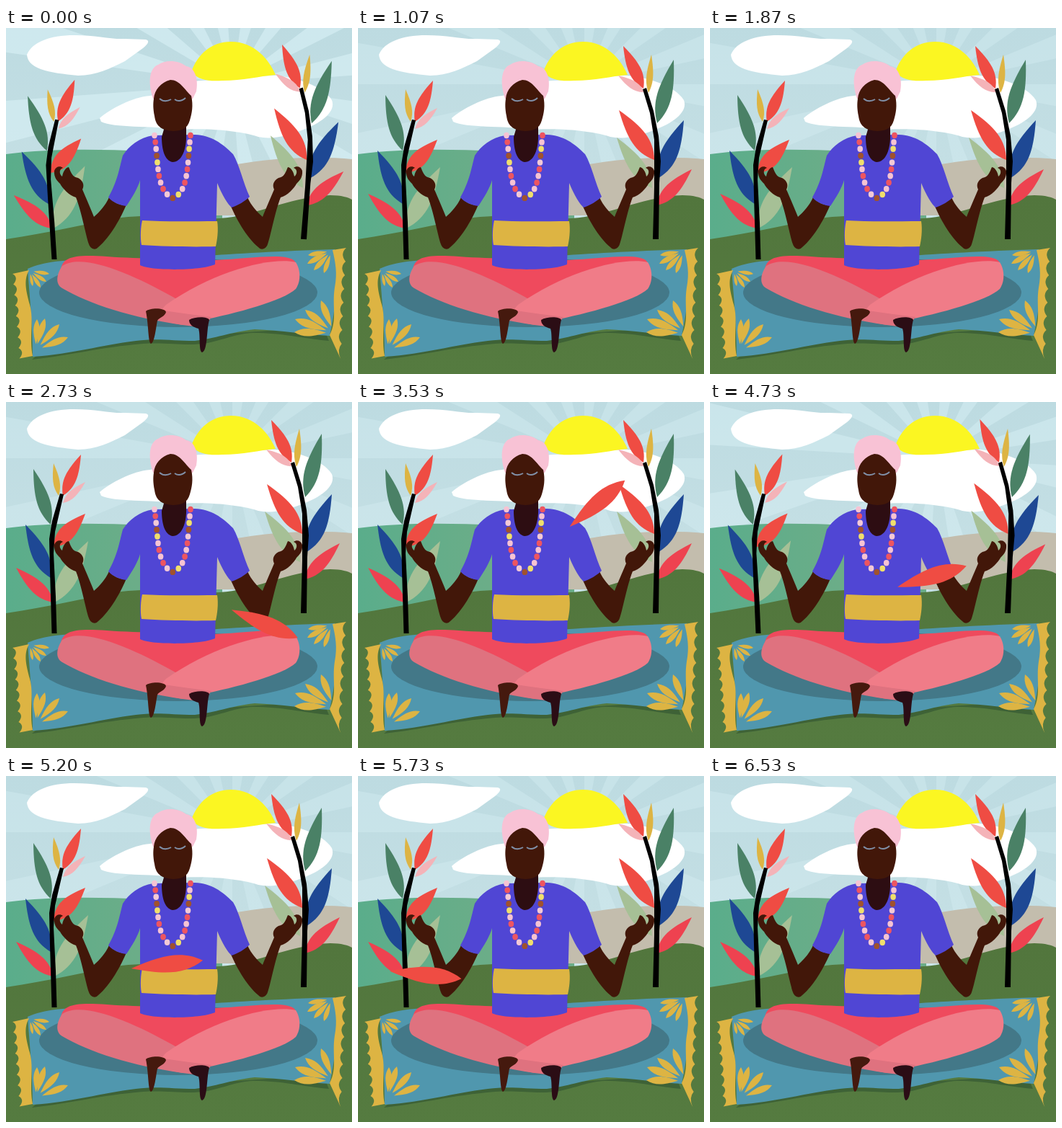
Animation, 480 px wide and 480 px high, one loop 6.59 s. Source, as an HTML page:

```html
<!DOCTYPE html>
<html lang="en">
<head>
<meta charset="utf-8">
<title>Meditation in the wind</title>
<style>
html, body { margin: 0; width: 100%; height: 100%; overflow: hidden; }
svg { display: block; width: 100vw; height: 100vh; }
</style>
</head>
<body>
<svg viewBox="0 0 480 480">
  <defs>
    <linearGradient id="sky" x2="0" y2="1">
      <stop stop-color="#bddbe1"/><stop offset=".4" stop-color="#c4dfe4"/>
    </linearGradient>
    <linearGradient id="hill">
      <stop stop-color="#5aad8b"/><stop offset=".6" stop-color="#6bad88"/>
    </linearGradient>
    <linearGradient id="grass" x2="0" y2="1">
      <stop stop-color="#52763d"/><stop offset="1" stop-color="#557b40"/>
    </linearGradient>
    <path id="arm" fill="#421709" d="M143 235C150 243 160 247 167 245C160 262 145 290 128 304C125 308 118 308 115 300C110 285 105 255 97 235C88 233 78 222 75 216C72 213 66 208 67 198C69 192 75 191 79 194C73 196 74 203 78 206C79 200 82 194 87 193C90 200 92 207 100 208C107 212 109 218 106 224C112 238 118 252 122 262C130 255 138 246 143 235Z"/>
  </defs>

  <rect width="480" height="480" fill="url(#sky)"/>
  <g id="rays" fill="#d6eff4"></g>
  <path fill="#fff" d="M29 37C36 20 60 10 95 10C125 10 145 16 165 15L194 16Q202 18 190 28L165 46C145 56 125 66 100 66C80 64 62 62 48 57C35 52 30 46 29 37Z"/>
  <path fill="#fff" d="M130 125C145 112 175 96 200 94C240 86 250 74 270 73C310 72 350 66 374 66C400 68 440 80 452 100C458 115 440 130 415 140C390 150 370 155 350 151C320 141 270 139 240 141C200 135 150 139 132 130Z"/>
  <path fill="#fbf622" d="M257 61C266 36 285 19 312 19C345 19 365 44 374 65C350 67 330 73 300 73C282 74 268 73 257 61Z"/>

  <path fill="url(#hill)" d="M0 175C60 167 130 168 190 171L300 190V300H0Z"/>
  <path fill="#c3bdad" d="M290 196C350 180 430 177 480 182V260H290Z"/>
  <path fill="url(#grass)" d="M0 293C60 284 110 272 160 263C220 256 260 270 315 262C360 254 400 234 450 232C465 232 475 235 480 238V480H0Z"/>

  <path fill="#3e6236" d="M36 460C90 454 130 443 190 438C230 436 250 442 280 437C310 430 325 422 350 423C390 424 420 432 448 434L440 415L60 440Z"/>
  <path fill="#5097ae" d="M30 334C60 320 110 321 150 322C220 322 300 312 456 307C462 350 457 390 449 427C420 426 380 419 345 418C310 422 290 431 262 434C230 434 210 430 180 434C130 440 95 452 37 456C37 415 33 375 30 334Z"/>
  <ellipse cx="239" cy="367" rx="193" ry="48" fill="#437888"/>
  <g id="rug" fill="#ddb443">
    <path d="M32 336L9 341q9 5 1.2 14.7q9 5 1.2 14.7q9 5 1.2 14.7q9 5 1.2 14.7q9 5 1.2 14.7q9 5 1.2 14.7q9 5 1.2 14.7q9 5 1.2 14.7L37 455C32 430 39 405 33 384C28 365 24 350 32 336Z"/>
    <path d="M453 308L472 305q-9 8 -.9 19q-9 8 -.9 19q-9 8 -.9 19q-9 8 -.9 19q-9 8 -.9 19q-9 8 -.9 19q-9 8 -.9 19q-7 8 -1.5 21L449 426C460 405 452 385 456 360C460 340 457 325 453 308Z"/>
  </g>

  <g id="left"></g>
  <g id="right"></g>

  <path fill="#ef4a5d" d="M76 336C78 317 95 314 140 317C190 321 230 318 290 322C340 320 390 311 401 324L405 345L240 400Z"/>
  <path fill="#df727f" d="M78 330C70 342 68 355 78 361C115 383 175 402 245 412L285 400L235 375C170 338 105 312 78 330Z"/>
  <path fill="#f07c88" d="M402 325C370 317 290 336 222 384C205 400 225 407 268 406C320 396 385 378 402 362C410 350 408 334 402 325Z"/>
  <path fill="#df727f" d="M205 390Q245 396 285 401L275 415Q240 413 215 405Z"/>
  <path fill="#45190e" d="M194 393C200 388 220 388 222 394C221 400 212 402 210 406C208 416 206 437 201 438C197 436 198 412 194 393Z"/>
  <path fill="#2b0d15" d="M254 405C262 400 280 400 282 405C278 418 280 448 272 450C267 448 270 425 267 417C260 415 254 412 254 405Z"/>

  <use href="#arm"/>
  <use href="#arm" transform="matrix(-1 0 0 1 478 0)"/>
  <path fill="#5046d4" d="M204 149C185 152 170 164 162 177C157 195 155 212 142 235C148 242 158 246 167 247C175 235 183 222 186 211L186 329C200 337 270 337 290 328L293 215C300 232 308 245 313 249C322 246 332 240 338 234C329 215 324 190 315 175C300 160 285 149 262 148Z"/>
  <path fill="#ddb443" d="M189 267C220 269 260 268 293 268C295 280 293 295 291 303C260 304 220 303 188 301C186 290 187 275 189 267Z"/>
  <path fill="#2d0d12" d="M221 134H250L250 146C251 168 244 186 231 186C220 184 216 168 216 151Z"/>
  <path fill="#f8c2d5" d="M204 98C197 77 198 56 211 51C222 43 240 45 250 53C263 55 267 72 264 88L259 98Z"/>
  <path fill="#421709" d="M205 98C206 86 215 75 228 72C241 72 248 86 257 94C260 108 258 118 255 128C252 140 242 143 232 143C218 142 208 138 206 122C204 112 204 105 205 98Z"/>
  <path fill="none" stroke="#8090a8" stroke-width="2" d="M213 98Q220 104 229 99M234 99Q241 104 249 97"/>
  <path id="string" fill="none" d="M206 149C212 190 208 225 231 236C254 228 251 190 256 149"/>
  <g id="beads"></g>
  <path id="flyer" fill="#ef4c43"/>
</svg>
<script>
const LOOP = 6590, SWAY = 4400;
const red = '#ef4c43', rose = '#ee4250', pink = '#f4b3b8', gold = '#ddb443',
      green = '#4a8166', pale = '#a6c096', blue = '#1e4894';
const $ = id => document.getElementById(id);

function add(parent, tag, attrs) {
  const el = document.createElementNS('http://www.w3.org/2000/svg', tag);
  for (const k in attrs) el.setAttribute(k, attrs[k]);
  return parent.appendChild(el);
}

// Pointed leaf from (x, y) to (u, v), about w wide.
function leaf(x, y, u, v, w) {
  const dx = u - x, dy = v - y, k = w * .67 / Math.hypot(dx, dy);
  const at = (f, s) => `${x + dx * f - dy * k * s} ${y + dy * f + dx * k * s}`;
  return `M${x} ${y}C${at(.28, 1.1)} ${at(.55, .9)} ${u} ${v}C${at(.55, -.9)} ${at(.28, -1.1)} ${x} ${y}Z`;
}

// Each leaf: base, tip, width, colour.
function plant(id, stem, leaves) {
  for (const [x, y, u, v, w, fill] of leaves)
    add($(id), 'path', { d: leaf(x, y, u, v, w), fill });
  add($(id), 'path', { d: stem });
}
plant('left', 'M63.5 321H70.5L69 270L66 210L68 180L80 128L75 127L64 165L60 190L61 235Z', [
  [79, 130, 104, 73, 16, red], [73, 130, 66, 85, 9, gold], [79, 140, 110, 111, 10, pink],
  [62, 170, 38, 93, 18, green], [66, 201, 110, 155, 21, red], [62, 244, 27, 170, 21, blue],
  [67, 278, 114, 193, 25, pale], [66, 278, 14, 230, 18, rose]
]);
plant('right', 'M409 293H417L418 215L420 185L417 150L410 115L400 83L395 85L405 118L411 155L411 220Z', [
  [396, 84, 368, 25, 17, red], [397, 89, 361, 66, 11, pink], [403, 90, 407, 37, 9, gold],
  [415, 132, 438, 44, 20, green], [411, 183, 362, 114, 22, red], [417, 208, 452, 128, 23, blue],
  [408, 222, 359, 152, 21, pale], [414, 246, 463, 196, 18, rose]
]);

// Petal bursts in the corners of the rug.
const bursts = [
  [41, 447, 43, 404, 54, 403, 74, 411, 86, 429],
  [33, 337, 60, 341, 56, 352, 48, 360, 37, 358],
  [452, 309, 419, 315, 418, 327, 427, 336, 441, 340],
  [455, 423, 400, 422, 401, 404, 415, 391, 437, 378]
];
for (const [x, y, ...tips] of bursts)
  for (let i = 0; i < 8; i += 2) {
    const u = tips[i], v = tips[i + 1], near = .2;
    add($('rug'), 'path', {
      d: leaf(u, v, x + (u - x) * near, y + (v - y) * near, Math.hypot(u - x, v - y) * .19)
    });
  }

const beadColors = ['#f6c3d3', '#ee5560', '#f3c9d6', '#a0522d', '#f0df6c', '#f6c3d3', '#ee5560'];
const string = $('string'), len = string.getTotalLength();
for (let i = 0; i < 21; i++) {
  const { x, y } = string.getPointAtLength(len * i / 20);
  add($('beads'), 'ellipse', { cx: x, cy: y, rx: 3.8, ry: 4.2, fill: beadColors[i % 7] });
}

for (let i = 0; i < 16; i++) {
  const pt = a => `${314 + 600 * Math.cos(a)} ${78 + 600 * Math.sin(a)}`;
  const a = i * Math.PI / 8;
  add($('rays'), 'path', { d: `M314 78L${pt(a)}L${pt(a + .18)}Z` });
}

// Wind-blown leaf: time, x, y, angle.
const flight = [
  [2050, 550, 410, 60], [2730, 359, 308, 23], [3530, 332, 141, -40],
  [4730, 308, 242, -17], [5730, 94, 276, 6], [6330, -65, 300, 20]
];
$('flyer').setAttribute('d', leaf(50, 0, -50, 0, 23));

function along(keys, t) {
  const i = Math.min(keys.length - 2, Math.max(0, keys.findIndex(k => k[0] > t) - 1));
  const a = keys[i], b = keys[i + 1], p = keys[i - 1] || a, n = keys[i + 2] || b;
  const h = b[0] - a[0], f = (t - a[0]) / h;
  return [1, 2, 3].map(c => {
    const m = (b[c] - p[c]) / (b[0] - p[0]) * h, q = (n[c] - a[c]) / (n[0] - a[0]) * h;
    const d = b[c] - a[c];
    return a[c] + f * (m + f * (3 * d - 2 * m - q + f * (m + q - 2 * d)));
  });
}

function draw(t) {
  const phase = t % SWAY, f = Math.min(1, Math.min(phase, SWAY - phase) / 600);
  const calm = 1 - f * f * (3 - 2 * f);
  $('left').setAttribute('transform', `rotate(${-2 * calm} 67 321)`);
  $('right').setAttribute('transform', `rotate(${3.2 * calm} 413 293)`);
  $('rays').setAttribute('transform', `rotate(${8 * calm} 314 78)`);
  $('rays').setAttribute('opacity', .4 + .3 * calm);

  const flying = t > flight[0][0] && t < flight[flight.length - 1][0];
  $('flyer').style.display = flying ? '' : 'none';
  if (flying) {
    const [x, y, a] = along(flight, t);
    $('flyer').setAttribute('transform', `translate(${x} ${y}) rotate(${a})`);
  }
}

const start = performance.now();
(function tick() {
  draw((performance.now() - start) % LOOP);
  requestAnimationFrame(tick);
})();
</script>
</body>
</html>
```
